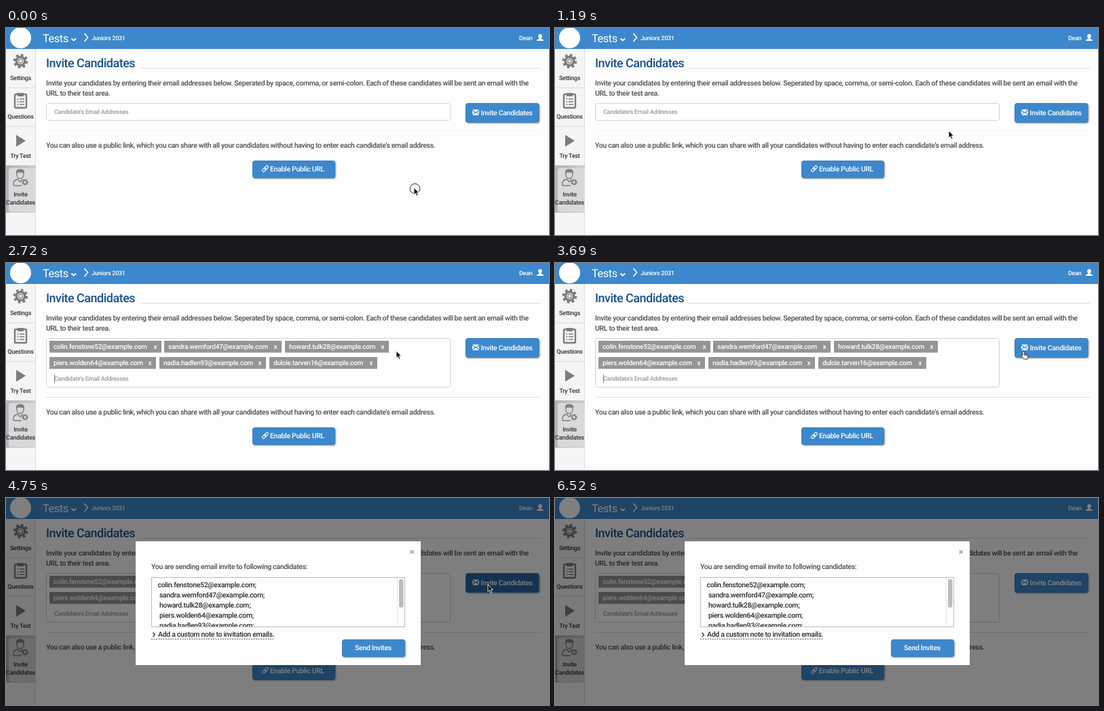
Recreate the animation shown at these times as an HTML page. Size 800 by 306 pixels, loop 7600 ms.

```html
<!DOCTYPE html>
<html lang="en">
<head>
<meta charset="utf-8">
<title>Invite Candidates</title>
<style>
  html, body { margin: 0; width: 100%; height: 100%; overflow: hidden; background: #fdfdfd; }
  svg { display: block; width: 800px; height: 306px; }
  text {
    font: 500 10.5px Roboto, "Open Sans", sans-serif;
    letter-spacing: -.317px; fill: #4c4c4c; text-rendering: geometricPrecision; white-space: pre;
  }
  .mid { text-anchor: middle; }
  .small { font-size: 9px; letter-spacing: -.27px; fill: #333; }
  .hint { font-size: 9px; letter-spacing: -.26px; fill: #999; }
  .title { font-size: 18px; letter-spacing: -.52px; fill: #17528f; }
  .brand { font-size: 16.5px; font-weight: 400; letter-spacing: -.5px; }
  .white, .tag text { fill: #fff; }
  .tag text { font-size: 10px; letter-spacing: -.25px; }
  .tag rect { fill: #959595; }
  .dark { fill: #2a2a2a; }
  .rule { stroke: #dcdcdc; }
  .btn { fill: #3d88cc; stroke: #367dc0; filter: drop-shadow(1px 1px 1px rgba(0,0,0,.4)); }
  .line { fill: none; stroke: #fff; }
  .icon { fill: none; stroke: #7c7c7c; }

  .low, .field, .split, .ring, .caret, .tags, .modal, .arrow, .hand { animation: 7.6s step-end infinite; }
  .low { animation-name: drop; }
  .field { animation-name: grow; }
  .split { animation-name: split; }
  .ring { animation-name: ring; }
  .caret { animation-name: blink; }
  .tags { animation-name: paste; }
  .modal { animation-name: open; }
  .arrow { animation-name: arrow; }
  .hand { animation-name: hand; }
  .cursor { animation: move 7.6s ease-in-out infinite; }
  .press { animation: press 7.6s linear infinite; }
  .glow { animation: glow 7.6s linear infinite; }

  @keyframes ring { 0% { opacity: 1 } .79%, 100% { opacity: 0 } }
  @keyframes drop { 0% { transform: translateY(0) } 34.61%, 100% { transform: translateY(47px) } }
  @keyframes grow { 0% { height: 25px } 34.61%, 100% { height: 72px } }
  @keyframes split { 0% { stroke: #f2f2f2 } 34.61%, 100% { stroke: #dcdcdc } }
  @keyframes paste { 0% { opacity: 0 } 34.61%, 100% { opacity: 1 } }
  @keyframes blink {
    0% { opacity: 0 } 22.9% { opacity: 1 } 29.08% { opacity: 0 }
    34.61% { opacity: 1 } 57.7%, 100% { opacity: 0 }
  }
  @keyframes open { 0% { opacity: 0 } 61.32% { opacity: .55 } 62.5%, 100% { opacity: 1 } }
  @keyframes arrow {
    0% { opacity: 1 } 47.7% { opacity: 0 } 57.7% { opacity: 1 } 85.79%, 100% { opacity: 0 }
  }
  @keyframes hand { 0% { opacity: 0 } 47.7% { opacity: 1 } 57.7%, 100% { opacity: 0 } }
  @keyframes move {
    0%, 6.97% { transform: translate(601px, 236px) }
    15.66% { transform: translate(580px, 152px) }
    17.11% { transform: translate(579px, 149px) }
    23.6%, 41.97% { transform: translate(575px, 130px) }
    48.55% { transform: translate(690px, 130px); animation-timing-function: ease-out }
    51.45%, 53.82% { transform: translate(706px, 129px) }
    57.9%, 79.08% { transform: translate(710px, 128px); animation-timing-function: ease-in }
    85.7%, 100% { transform: translate(650px, 308px) }
  }
  @keyframes press {
    0%, 57.3% { fill: #3d88cc } 58.9%, 79.5% { fill: #2965a2 } 81%, 100% { fill: #3d88cc }
  }
  @keyframes glow {
    0%, 57.3% { opacity: 0 } 58.9%, 61.3% { opacity: 1 } 62.5%, 100% { opacity: 0 }
  }
</style>
</head>
<body>
<svg viewBox="0 0 800 306">
  <defs>
    <linearGradient id="sel"><stop offset="0" stop-color="#b4b4b4"/><stop offset="1" stop-color="#cecece"/></linearGradient>
    <clipPath id="box"><rect x="214" y="118" width="362" height="72"/></clipPath>
  </defs>
  <rect width="800" height="306" fill="#fdfdfd"/>

  <!-- sidebar -->
  <rect y="31" width="43" height="275" fill="#f5f5f5"/>
  <path class="rule" d="M43.5 31V306M0 88.5H43M0 145.5H43"/>
  <rect y="203" width="44" height="70" fill="url(#sel)"/>
  <path d="M44 207H8q-4 0-4 4V268q0 4 4 4H44z" fill="#d8d9db"/>
  <g class="icon">
    <circle cx="21.5" cy="49" r="9" stroke-width="3.6" stroke-dasharray="3.7 3.37"/>
    <circle cx="21.5" cy="49" r="6.3" stroke-width="3.4"/>
    <circle cx="21.5" cy="49" r="2.8" stroke-width="1.2"/>
    <rect x="13" y="98" width="17" height="20" rx="1.5" stroke-width="2.4"/>
    <path d="M17 98.5H26" stroke-width="5"/>
    <path d="M16.5 105H18.5M20 105H27M16.5 109H18.5M20 109H27M16.5 113H18.5M20 113H27" stroke-width="1.5"/>
    <path d="M15 158V175.5L29 166.8z" fill="#7c7c7c" stroke="none"/>
    <path d="M16 216q0 6.5 5 6.5t5-6.5v-3H16z" stroke-width="1.3"/>
    <path d="M15 216v-3q0-4.500 6-4.500t6 4.500v3l-2-3q-4 0-6-1.500z" fill="#7c7c7c" stroke="none"/>
    <path d="M11 233v-3q0-5 6-6.500l4 4 3.500-4M11 233H23" stroke-width="1.4"/>
    <circle cx="28" cy="228" r="3.4" stroke-width="2.4" stroke-dasharray="1.8 .87"/>
    <circle cx="28" cy="228" r="2.6" stroke-width="1.4"/>
  </g>
  <g class="mid">
    <text class="small" x="21.5" y="77">Settings</text>
    <text class="small" x="21.5" y="134">Questions</text>
    <text class="small" x="21.5" y="191.500">Try Test</text>
    <text class="small" x="21.5" y="249">Invite</text>
    <text class="small" x="21.5" y="261">Candidates</text>
  </g>

  <!-- top bar -->
  <rect width="800" height="31" fill="#3d88cc"/>
  <circle cx="21.5" cy="14.5" r="15.5" fill="#fff"/>
  <text class="brand white" x="54" y="20.5">Tests</text>
  <path class="line" d="M96.5 15.5l3.3 3 3.3-3" stroke-width="1.9"/>
  <path class="line" d="M115.5 8l5 6-5 6" stroke-width="1.6"/>
  <text class="small white" x="126" y="18">Juniors 2031</text>
  <text class="small white" x="756" y="18">Dean</text>
  <path d="M787 9q2.8 0 2.8 3 0 2-1.3 3.200v.8l3 1.300q.5.300.5 1.700H782q0-1.400.5-1.700l3-1.300v-.8Q784.200 14 784.200 12q0-3 2.800-3z" fill="#fff"/>

  <!-- form -->
  <text class="title" x="59" y="58">Invite Candidates</text>
  <path class="rule" d="M197 59.5H788"/>
  <text x="59" y="85">Invite your candidates by entering their email addresses below. Seperated by space, comma, or semi-colon. Each of these candidates will be sent an email with the</text>
  <text x="59" y="99.5">URL to their test area.</text>
  <rect class="field" x="59.5" y="111.500" width="595" height="25" rx="3" fill="#fff" stroke="#d2d2d2"/>
  <g class="tags" id="tags"></g>
  <g class="low">
    <text class="hint" x="71" y="126.500">Candidate's Email Addresses</text>
    <path class="caret" d="M71.5 118V130" stroke="#777"/>
    <path class="split" d="M59 151.500H788" stroke="#f2f2f2"/>
    <text x="59" y="177">You can also use a public link, which you can share with all your candidates without having to enter each candidate's email address.</text>
    <rect class="btn" x="363.5" y="196.500" width="121" height="25" rx="3"/>
    <g class="line" stroke-width="1.1" transform="translate(382 208) rotate(-45)">
      <rect x="-5.6" y="-1.9" width="6.6" height="3.8" rx="1.9"/>
      <rect x="-1" y="-1.9" width="6.6" height="3.8" rx="1.9"/>
    </g>
    <text class="white" x="389" y="211.500">Enable Public URL</text>
  </g>
  <rect class="glow" x="676" y="110" width="111" height="31" rx="4" fill="none" stroke="#79b4ea" stroke-width="2"/>
  <rect class="btn press" x="677.5" y="111.500" width="107.5" height="28" rx="3"/>
  <path d="M687 120.500h10l-5 4zM687 122l3 2.500-3 3.500zM697 122l-3 2.500 3 3.500zM687.500 129l3.300-3.800 1.200.9 1.200-.9 3.300 3.800z" fill="#fff"/>
  <text class="white" x="699.5" y="128.500">Invite Candidates</text>

  <!-- dialog -->
  <g class="modal">
    <rect width="800" height="306" fill="#000" opacity=".5"/>
    <rect x="191" y="64" width="420" height="183" fill="#fdfdfd"/>
    <path d="M595.7 77.200l5 5m0-5l-5 5" stroke="#999" stroke-width="1.5"/>
    <text x="214" y="105">You are sending email invite to following candidates:</text>
    <rect x="214.5" y="117.500" width="373" height="73" fill="#fff" stroke="#bbb"/>
    <path d="M576.5 118V190" stroke="#e4e4e4"/>
    <rect x="579" y="120" width="6.5" height="42" rx="3.2" fill="#bcbcbc"/>
    <g id="list" clip-path="url(#box)"></g>
    <path d="M216.5 199l3 3.200-3 3.200" fill="none" stroke="#333" stroke-width="1.3"/>
    <text class="dark" x="224" y="205">Add a custom note to invitation emails.</text>
    <path d="M214 208.500H394" stroke="#555" stroke-dasharray="2 1.5"/>
    <rect class="btn" x="495.5" y="209.500" width="92" height="25" rx="3"/>
    <text class="white mid" x="541" y="225">Send Invites</text>
  </g>

  <!-- pointer -->
  <circle class="ring" cx="602.5" cy="237.500" r="7.3" fill="#fff" stroke="#222"/>
  <g class="cursor">
    <path class="arrow" d="M0 0V10.500L2.400 8.300 4.100 12.300 6 11.500 4.300 7.600H7.500z" fill="#111" stroke="#fff" stroke-width=".8"/>
    <path class="hand" d="M-1.3 1Q0-.8 1.300 1V4.600L5.500 5.600Q7 6 6.800 7.600L6 12H.4L-3 7.200Q-3.200 5.200-1.300 6.400zM1.300 4.600V7M3.300 5.200V7M5.100 5.700V7.400" fill="#fff" stroke="#222" stroke-width=".9"/>
  </g>
</svg>
<script>
  // user, tag x, tag width
  const people = [
    ['colin.fenstone52', 64, 165], ['sandra.wemford47', 233, 173], ['howard.tulk28', 411, 153],
    ['piers.wolden64', 64, 157], ['nadia.hadlen93', 226, 157], ['dulcie.tarven16', 388, 159]
  ];
  const mail = user => user + '@example.com';

  document.getElementById('tags').innerHTML = people.map(([user, x, w], i) => {
    const y = i < 3 ? 115 : 139;
    return `<g class="tag"><rect x="${x}" y="${y}" width="${w}" height="17.5"/>
      <text x="${x + 6}" y="${y + 12}">${mail(user)}</text>
      <text x="${x + w - 11.5}" y="${y + 12}">x</text></g>`;
  }).join('');

  document.getElementById('list').innerHTML = people.map(([user], i) =>
    `<text class="dark" x="${i ? 226 : 223.5}" y="${132 + i * 14.9}">${mail(user)};</text>`
  ).join('');
</script>
</body>
</html>
```
